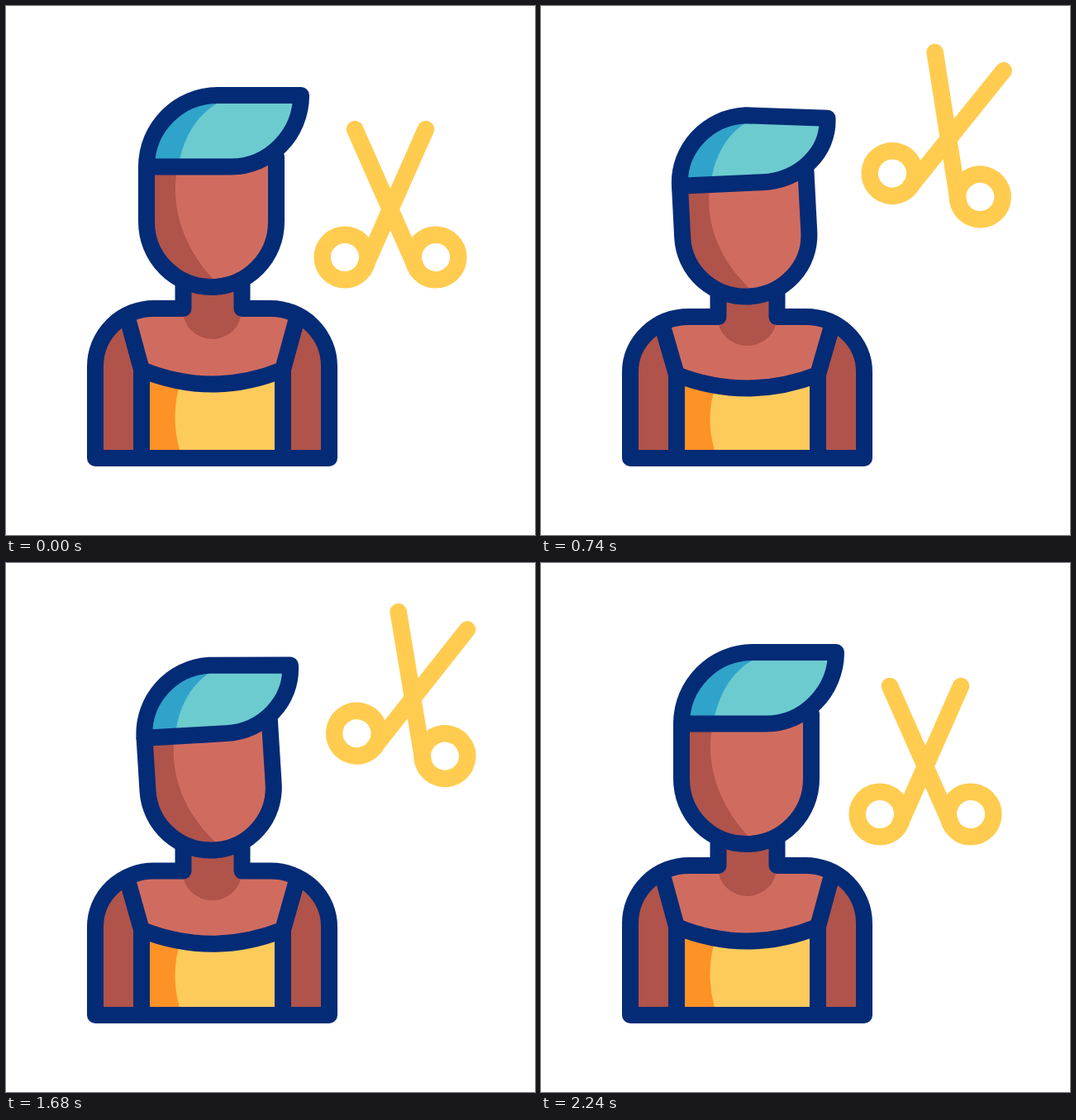
An HTML page for the animation above (2400 ms loop, 640 by 640 pixels).

```html
<!DOCTYPE html>
<html lang="en">
<head>
<meta charset="utf-8">
<title>Haircut</title>
<style>
html, body { margin: 0; width: 100%; height: 100%; overflow: hidden; background: #fff; }
svg { display: block; }
path, circle { vector-effect: non-scaling-stroke; }
.line { fill: none; stroke: #042b76; stroke-width: 20; stroke-linecap: round; stroke-linejoin: round; }
.skin { fill: #d06c5f; }
.shade { fill: #b0534a; }
#scissors { fill: none; stroke: #ffcc50; stroke-width: 20.5; stroke-linecap: round; }
</style>
</head>
<body>
<svg width="640" height="640">
  <defs>
    <g id="blade">
      <path d="M-43-97L30.4 68.8"/>
      <circle cx="55" cy="58" r="27.3"/>
    </g>
  </defs>
  <g id="person">
    <path class="shade" d="M108 547V436A71 70 0 0 1 179 366H320A71 70 0 0 1 391 436V547z"/>
    <path class="skin" d="M148 380Q160 366 179 366H320Q340 366 351 380L335 440Q249.5 475 164 440z"/>
    <path class="shade" d="M214 335V368a35.5 35 0 0 0 71 0V335z"/>
    <path fill="#fccb5c" d="M164 440Q249.5 475 335 440V547H164z"/>
    <path fill="#fd9226" d="M164 440Q186 450 211 455Q197 500 213 547H164z"/>
    <path class="line" d="M214.5 335V366H179A71 70 0 0 0 108 436V547H391V436A71 70 0 0 0 320 366H285.5V335"/>
    <path class="line" d="M148.5 383L164 440V547M350.5 383L335 440V547M164 440Q249.5 475 335 440"/>
    <g id="head">
      <path class="skin" d="M170 194.5V261A78.5 79 0 0 0 327 261V182z"/>
      <path class="shade" d="M170 194.5V261A78.5 79 0 0 0 248.5 340L256 336C215 295 198 245 207.500 194.5z"/>
      <path class="line" d="M170 194.5V261A78.5 79 0 0 0 327 261V182"/>
      <path id="hair" fill="#6ccbcf"/>
      <path fill="#30a3cb" d="M170 194.5C170 147 208.5 108 256 108L268 112C234 124 214 158 208.500 194.5z"/>
      <path id="hairline" class="line"/>
    </g>
  </g>
  <g id="scissors">
    <use id="left" href="#blade"/>
    <use id="right" href="#blade"/>
  </g>
</svg>
<script>
const LOOP = 2400;
const $ = id => document.getElementById(id);
const move = (id, value) => $(id).setAttribute('transform', value);

// Smooth 0..1 ramp between two times
function ramp(t, from, to) {
  const u = Math.min(1, Math.max(0, (t - from) / (to - from)));
  return u * u * (3 - 2 * u);
}

function draw(t) {
  const squash = 0.07 * (ramp(t, 400, 660) - ramp(t, 660, 940))
    + 0.067 * (ramp(t, 1480, 1860) - ramp(t, 1860, 2240));
  const tilt = ramp(t, 600, 940) - ramp(t, 1480, 1860);
  const droop = 150 * squash;
  const lift = ramp(t, 400, 820) - ramp(t, 1520, 2250);
  const snip = t > 880 && t < 1500 ? (1 - Math.cos((t - 880) / 155 * 2 * Math.PI)) / 2 : 0;

  move('person', `translate(0 547) scale(1 ${1 - squash}) translate(0 -547)`);
  move('head', `translate(${248.5 - 2 * tilt} 261) rotate(${-7.5 * tilt}) scale(${1 - 0.064 * tilt} 1) translate(-248.5 -261)`);

  const hair = `M170 194.5C170 147 208.5 108 256 108L357 ${108 + droop}C357 ${155 + 0.6 * droop} 319 194.5 272 194.5z`;
  $('hair').setAttribute('d', hair);
  $('hairline').setAttribute('d', hair);

  move('scissors', `translate(${465 + 31 * lift + 3 * snip} ${246 - 94 * lift - 6 * snip}) rotate(${16.5 * lift + 3.5 * snip})`);
  move('left', `rotate(${23.9 * snip})`);
  move('right', `scale(-1 1) rotate(${23.9 * snip})`);
}

const start = performance.now();
function tick() {
  draw((performance.now() - start) % LOOP);
  requestAnimationFrame(tick);
}
tick();
</script>
</body>
</html>
```
